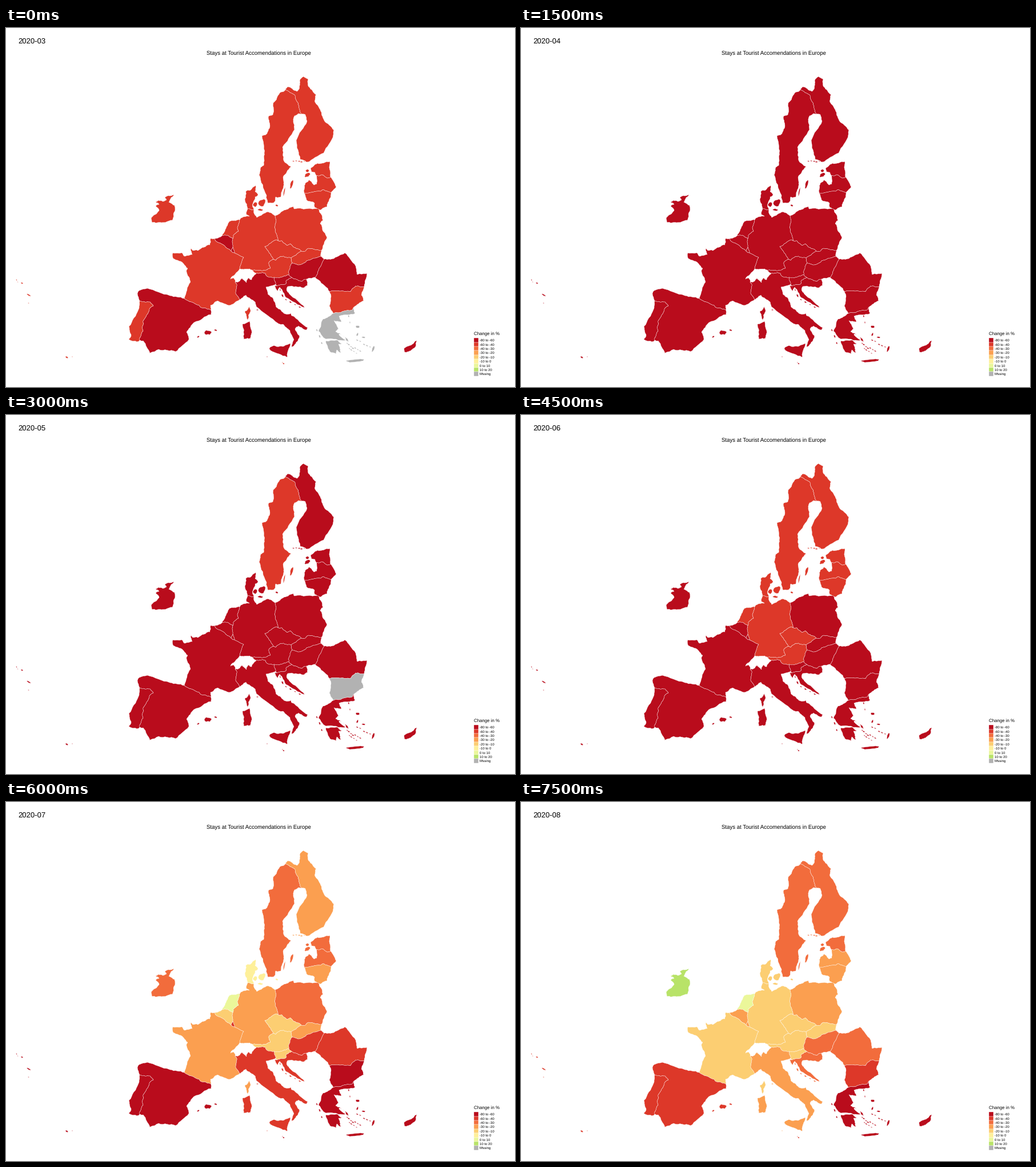
Recreate the animation shown at these times as a matplotlib script. Size 891x629 px, loop 8 s.

```python
import math
import numpy as np
import matplotlib.pyplot as plt
from matplotlib.animation import FuncAnimation
from matplotlib.patches import PathPatch, Rectangle
from matplotlib.path import Path

W, H, DPI = 891, 629, 64
PX = 72 / DPI
FRAME_MS, FRAMES, HOLD = 500, 16, 3
EDGE = dict(ec="white", lw=0.4 * PX, joinstyle="round")

SHADES = ["#B90C1C", "#DD3829", "#F26C3C", "#FB9F50", "#FCCE72",
          "#FEF09A", "#EBF79A", "#B8E368", "#B2B2B2"]
LABELS = [f"{lo} to {hi}" for lo, hi in
          [(-80, -60), (-60, -40)] + [(n, n + 10) for n in range(-40, 20, 10)]] + ["Missing"]

plt.rcParams["font.family"] = ["Liberation Sans", "DejaVu Sans"]
plt.rcParams["text.hinting"] = "none"
rng = np.random.default_rng(7)


def line(*nums, rough=0.13, reach=1.1):
    """Fractal line through a few x, y key points."""
    pts = np.array(nums, float).reshape(-1, 2)
    for _ in range(3):
        d = np.diff(pts, axis=0)
        size = np.minimum(rough, reach / np.hypot(*d.T))
        shift = size * rng.uniform(-1, 1, len(d))
        out = np.empty((2 * len(pts) - 1, 2))
        out[::2] = pts
        out[1::2] = pts[:-1] + d / 2 + np.c_[-d[:, 1], d[:, 0]] * shift[:, None]
        pts = out
    return pts


def ring(*nums):
    return line(*nums, *nums[:2])


def isle(x, y, w, h, tilt=0):
    a = np.arange(12) * math.pi / 6
    r = rng.uniform(0.8, 1.15, 12)
    u, v = w / 2 * r * np.cos(a), h / 2 * r * np.sin(a)
    c, s = math.cos(math.radians(tilt)), math.sin(math.radians(tilt))
    return np.c_[x + u * c - v * s, y + u * s + v * c]


def chain(x0, y0, x1, y1, n, size, spread=0):
    """Small islands strung along a line."""
    tilt = math.degrees(math.atan2(y1 - y0, x1 - x0))
    for t in np.linspace(0, 1, n):
        dx, dy = rng.uniform(-spread, spread, 2)
        w = size * rng.uniform(0.7, 1.3)
        yield isle(x0 + t * (x1 - x0) + dx, y0 + t * (y1 - y0) + dy, w, w * 0.5, tilt)


def rev(a):
    return a[::-1]


# Shared land borders
se_fi = line(489, 108, 506, 118, 513, 137, 517, 151)
ee_lv = line(568, 261, 562, 263, 553, 257, 544, 259)
lv_lt = line(569, 289, 556, 283, 551, 286, 522, 290)
pl_de = line(471, 329, 472, 342, 470, 349, 476, 373)
pl_cz = line(476, 373, 483, 373, 492, 381, 498, 378, 502, 383, 517, 391)
pl_sk = line(517, 391, 524, 391, 530, 386, 552, 390)
de_cz = line(476, 373, 474, 371, 453, 383, 468, 405)
de_at = line(468, 405, 460, 411, 463, 421, 450, 425, 430, 424)
cz_at = line(468, 405, 472, 407, 481, 400, 499, 403)
cz_sk = line(499, 403, 505, 399, 517, 391)
at_sk = line(499, 403, 501, 412)
at_hu = line(501, 412, 497, 418, 495, 432)
at_si = line(495, 432, 484, 436, 469, 437)
at_it = line(469, 437, 457, 435, 454, 430, 438, 430)
it_si = line(469, 437, 472, 449)
sk_hu = line(501, 412, 513, 415, 521, 412, 526, 408, 551, 400)
hu_si = line(495, 432, 500, 437)
si_hr = line(500, 437, 491, 442, 490, 448, 474, 452)
hu_hr = line(500, 437, 517, 444, 526, 440)
hu_ro = line(557, 405, 549, 420, 541, 437)
ro_bg = line(627, 453, 612, 452, 603, 462, 566, 462)
bg_gr = line(609, 489, 606, 494, 573, 500)
fr_es = line(312, 474, 338, 486, 342, 490, 359, 494)
fr_it = line(409, 476, 402, 463, 404, 449, 401, 445)
fr_de = line(400, 394, 416, 402, 409, 422)
fr_be = line(365, 369, 367, 373, 382, 381, 394, 391)
fr_lu = line(394, 391, 400, 394)
be_lu = line(394, 391, 397, 384)
lu_de = line(397, 384, 400, 394)
be_de = line(397, 369, 396, 375, 397, 384)
be_nl = line(378, 364, 387, 363, 397, 369)
nl_de = line(409, 336, 405, 349, 407, 356, 398, 363, 397, 369)
de_dk = line(423, 317, 434, 319)
es_pt = line(234, 478, 243, 480, 252, 480, 258, 487, 251, 492, 240, 513, 240, 531, 234, 547)

# Coasts and outer frontiers
fi = line(517, 151, 523, 151, 527, 163, 508, 197, 515, 230, 527, 235, 556, 219, 573, 187,
          574, 179, 557, 162, 550, 143, 541, 130, 543, 117, 530, 103, 529, 90, 521, 85,
          514, 92, 513, 107, 509, 111, 493, 103, 489, 108)
se = line(489, 108, 479, 114, 468, 131, 467, 152, 460, 154, 461, 176, 457, 185, 448, 189,
          452, 219, 451, 241, 446, 244, 443, 257, 456, 293, 458, 307, 469, 306, 472, 296,
          481, 296, 486, 276, 485, 262, 499, 243, 486, 232, 484, 209, 505, 178, 503, 163,
          505, 154, 512, 150, 517, 151)
ee = line(544, 259, 541, 253, 535, 252, 533, 246, 545, 237, 567, 234, 568, 261)
lv_w = line(544, 259, 544, 273, 539, 275, 530, 266, 524, 272, 522, 290)
lv_e = line(568, 261, 578, 278, 569, 289)
lt = line(522, 290, 526, 301, 540, 307, 540, 314, 550, 319, 562, 313, 566, 300, 569, 289)
pl = line(552, 390, 562, 367, 554, 354, 550, 342, 555, 337, 547, 317, 505, 317, 503, 313,
          487, 319, 471, 329)
de_n = line(434, 319, 434, 324, 439, 332, 459, 322, 471, 329)
de_w = line(409, 336, 411, 333, 426, 330, 421, 327, 423, 317)
de_s = line(430, 424, 422, 422, 409, 422)
dk = line(434, 319, 432, 308, 436, 296, 441, 293, 436, 286, 437, 276, 428, 284, 420, 286,
          418, 300, 423, 317)
nl = line(378, 364, 385, 351, 391, 339, 409, 336)
be = line(365, 369, 378, 364)
at_ch = line(438, 430, 430, 424)
sk_e = line(552, 390, 551, 400)
hu_e = line(551, 400, 557, 405)
hu_s = line(541, 437, 526, 440)
ro_n = line(557, 405, 574, 404, 593, 394, 612, 417, 615, 432, 632, 430, 627, 453)
ro_w = line(566, 462, 563, 456, 541, 437)
bg_e = line(627, 453, 622, 468, 626, 478, 609, 489)
bg_w = line(573, 500, 566, 487, 569, 470, 566, 462)
gr = line(573, 500, 555, 510, 547, 531, 560, 545, 595, 547, 593, 541, 577, 532, 582, 527,
          574, 513, 587, 515, 583, 505, 611, 500, 609, 489)
hr = line(474, 452, 470, 452, 475, 461, 479, 454, 490, 472, 523, 490, 496, 466, 491, 459,
          493, 453, 522, 455, 528, 451, 526, 440)
it_s = line(472, 449, 455, 454, 459, 467, 466, 472, 473, 489, 489, 501, 499, 500, 500, 504,
            528, 525, 526, 529, 512, 522, 506, 527, 514, 540, 511, 548, 500, 559, 504, 546,
            497, 530, 485, 519, 477, 518, 438, 488, 436, 480, 420, 468, 409, 476)
it_n = line(401, 445, 408, 444, 413, 438, 421, 446, 424, 438, 430, 441, 438, 430)
fr_ch = line(409, 422, 393, 440, 399, 438, 401, 445)
fr_w = line(365, 369, 358, 369, 357, 380, 336, 390, 327, 390, 322, 383, 326, 397, 313, 400,
            308, 394, 292, 394, 293, 404, 309, 411, 318, 421, 316, 427, 323, 445, 312, 474)
fr_s = line(359, 494, 358, 486, 370, 478, 390, 486, 409, 476)
es_n = line(312, 474, 287, 469, 247, 456, 233, 460, 230, 465, 234, 478)
es_s = line(234, 547, 240, 548, 252, 570, 267, 563, 297, 567, 320, 546, 316, 533, 329, 516,
            359, 502, 359, 494)
pt = line(234, 478, 232, 493, 215, 523, 219, 537, 215, 546, 229, 550, 234, 547)

fig = plt.figure(figsize=(W / DPI, H / DPI), dpi=DPI, facecolor="white")
ax = fig.add_axes([0, 0, 1, 1])
ax.set_xlim(0, W)
ax.set_ylim(H, 0)
ax.axis("off")
lands = []


def land(classes, mainland, *isles):
    """Add a country; classes holds one shade index per month."""
    rings = [np.vstack(mainland), *isles]
    path = Path.make_compound_path(*[Path(np.vstack([r, r[:1]]), closed=True) for r in rings])
    patch = ax.add_patch(PathPatch(path, **EDGE))
    lands.append((patch, [int(c) for c in classes]))


land("101122", [se, rev(se_fi)], isle(500, 274, 4.5, 15, 15), isle(487, 287, 2, 16, 12))
land("100132", [fi, se_fi], *chain(503, 233, 522, 234, 5, 3.5, 1))
land("100122", [ee, ee_lv], isle(527.5, 257.5, 10, 6, -30), isle(527.5, 250, 6, 5))
land("100123", [rev(ee_lv), lv_e, lv_lt, rev(lv_w)])
land("100133", [lt, lv_lt])
land("100023", [pl, pl_de, pl_cz, pl_sk])
land("100134", [de_n, pl_de, de_cz, de_at, de_s, rev(fr_de), rev(lu_de), rev(be_de),
                rev(nl_de), de_w, de_dk])
land("100154", [dk, de_dk], isle(436, 309.5, 8, 8), isle(448, 306.5, 11, 14, 30),
     isle(445, 318.5, 10, 3.5, 5), isle(474, 311, 4.5, 3, 25))
land("100166", [nl, nl_de, rev(be_nl)])
land("000043", [be, be_nl, be_de, rev(be_lu), rev(fr_be)])
land("000013", [be_lu, lu_de, rev(fr_lu)])
land("100034", [fr_w, fr_es, fr_s, fr_it, rev(fr_ch), rev(fr_de), rev(fr_lu), rev(fr_be)],
     ring(426, 488, 428, 497, 423, 512, 418, 497, 424, 492))
land("100144", [cz_at, at_sk, at_hu, at_si, at_it, at_ch, rev(de_at)])
land("100144", [de_cz, cz_at, cz_sk, rev(pl_cz)])
land("100034", [cz_sk, pl_sk, sk_e, rev(sk_hu), rev(at_sk)])
land("000012", [at_hu, hu_si, hu_hr, rev(hu_s), rev(hu_ro), rev(hu_e), rev(sk_hu)])
land("000012", [ro_n, ro_bg, ro_w, rev(hu_ro)])
land("108001", [bg_e, bg_gr, bg_w, rev(ro_bg)])
land("800000", [gr, bg_gr],
     ring(560, 548, 580, 547, 588, 553, 582, 554, 587, 569, 579, 564, 578, 571, 567, 567),
     isle(592, 543, 22, 4, 36), isle(611, 583, 34, 5, -4), isle(643, 562, 4, 11, 20),
     isle(615.5, 523.5, 7, 4), isle(615, 537, 3, 6, 20), isle(626, 542, 6, 2.5),
     *chain(600, 505, 602, 516, 2, 4.5), *chain(544, 529, 553, 552, 3, 5, 1),
     *chain(597, 553, 621, 566, 7, 3.6, 2), *chain(601, 562, 614, 569, 4, 3, 1),
     *chain(614, 547, 637, 559, 5, 3.5, 1.5))
land("000012", [si_hr, hr, rev(hu_hr)], *chain(480, 459, 484, 469, 2, 5),
     *chain(490, 476, 514, 489, 4, 4))
land("000044", [at_si, it_si, rev(si_hr), rev(hu_si)])
land("000013", [it_s, fr_it, it_n, rev(at_it), it_si],
     ring(414, 519, 427, 514, 430, 530, 428, 544, 416, 545, 416, 533),
     ring(461, 561, 467, 557, 484, 558, 498, 553, 493, 568, 492, 577, 463, 565),
     isle(440, 494, 3.5, 2), isle(457, 576, 1.8, 1.5))
land("000001", [es_n, es_pt, es_s, rev(fr_es)],
     isle(353.5, 533.5, 13, 8), isle(367, 529.5, 5, 2.6, 25), isle(336.5, 541, 4.5, 2.6, -30))
land("100001", [pt, rev(es_pt)], *chain(18.5, 441.5, 20.5, 445, 2, 2.2), isle(28, 447, 4, 2, 20),
     isle(40, 468, 7.5, 2.4, 30), isle(39.5, 482, 1.8, 1.4),
     isle(106.5, 577, 5.5, 2.8, 25), isle(116, 576, 1.4, 1.2))
land("100027", [ring(281, 301, 278, 297, 294, 292, 285, 305, 295, 311, 296, 320, 291, 337,
                     272, 341, 255, 340, 254, 333, 268, 320, 262, 312, 268, 309, 262, 305,
                     267, 302, 275, 304)])
land("000000", [ring(698, 568, 697, 561, 708, 556, 719, 547, 717, 558, 705, 567)])
land("100001", [isle(486, 588, 3, 2.2, 30)], isle(483.8, 586, 1.8, 1.3))


def label(x, y, s, size, **kw):
    return ax.text(x, y, s, fontsize=size * PX, color="black", va="baseline", **kw)


label(442, 47.2, "Stays at Tourist Accomendations in Europe", 9.65, ha="center")
label(818.8, 538.8, "Change in %", 7.9)
STEP = 7.36
for k, (shade, name) in enumerate(zip(SHADES, LABELS)):
    top = 543.4 + k * STEP
    ax.add_patch(Rectangle((819.4, top), 7.2, STEP, fc=shade, **EDGE))
    label(828.6, top + 5.9, name, 6.05)
date = label(21.7, 27, "", 13.1)


def draw(i):
    month = i // HOLD
    date.set_text(f"2020-{month + 3:02d}")
    for patch, classes in lands:
        patch.set_facecolor(SHADES[classes[month]])
    return [date, *(p for p, _ in lands)]


anim = FuncAnimation(fig, draw, frames=FRAMES, interval=FRAME_MS, repeat=True, repeat_delay=0)
plt.show()
```
